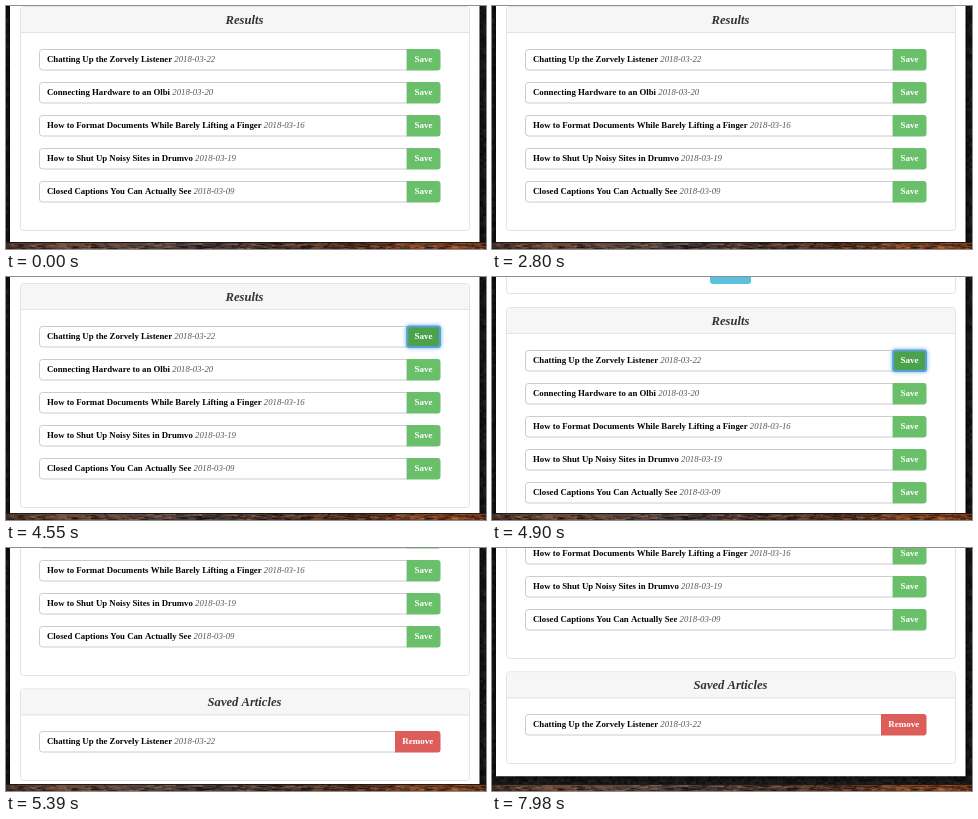
An HTML page with a canvas for the animation above (8000 ms loop, 480 by 243 pixels).

```html
<!DOCTYPE html>
<html lang="en">
<head>
<meta charset="utf-8">
<title>Saved articles</title>
<style>
html, body { margin: 0; width: 100%; height: 100%; overflow: hidden; background: #15181a; }
canvas { display: block; width: 480px; height: 243px; }
</style>
</head>
<body>
<canvas id="stage" width="480" height="243"></canvas>
<script>
const W = 480, H = 243, VIEW_BOTTOM = 236, LOOP = 8000, STEP = 70;
const FOCUS_AT = 3010;
const BUTTON_RIGHT = 434.5;
const BODY_SIZE = 8.78;
const SERIF = '"Liberation Serif", "Times New Roman", serif';
const ctx = document.getElementById('stage').getContext('2d');

const articles = [
  ['Chatting Up the Zorvely Listener', '2018-03-22'],
  ['Connecting Hardware to an Olbi', '2018-03-20'],
  ['How to Format Documents While Barely Lifting a Finger', '2018-03-16'],
  ['How to Shut Up Noisy Sites in Drumvo', '2018-03-19'],
  ['Closed Captions You Can Actually See', '2018-03-09']
];

// Page offset: [start, end, from, to]
const scrolls = [
  [4410, 4900, 0, 30],
  [4900, 5390, 30, -97],
  [5460, 5950, -97, -114]
];

function seeded(seed) {
  return () => (seed = (seed * 16807) % 2147483647) / 2147483647;
}

function makeBackdrop() {
  const layer = document.createElement('canvas');
  layer.width = W;
  layer.height = H;
  const g = layer.getContext('2d');
  const random = seeded(41);
  g.fillStyle = '#15181a';
  g.fillRect(0, 0, W, H);
  for (let y = 0; y < VIEW_BOTTOM; y += 3) {
    for (let x = 0; x < W; x += 3) {
      const v = 12 + random() * 20;
      g.fillStyle = `rgb(${v}, ${v + 2}, ${v + 3})`;
      g.fillRect(x, y, 3, 3);
    }
  }
  const ground = g.createLinearGradient(0, 0, W, 0);
  ['#3d2c26', '#6b4a3a', '#5a453d', '#4f4140', '#4c3a36', '#4d3228', '#5c3320', '#85431f', '#803c1a']
    .forEach((color, i, all) => ground.addColorStop(i / (all.length - 1), color));
  g.fillStyle = ground;
  g.fillRect(0, VIEW_BOTTOM, W, H - VIEW_BOTTOM);
  for (let i = 0; i < 420; i++) {
    g.fillStyle = random() < 0.55 ? 'rgba(15,10,10,.5)' : 'rgba(215,150,110,.28)';
    g.fillRect(random() * W, VIEW_BOTTOM + 1 + random() * 6, 3 + random() * 8, 1);
  }
  g.fillStyle = '#1c1918';
  g.fillRect(0, VIEW_BOTTOM, W, 1);
  return layer;
}

const backdrop = makeBackdrop();

function box(x, y, w, h, radius, fill, stroke) {
  ctx.beginPath();
  ctx.roundRect(x, y, w, h, radius);
  if (fill) {
    ctx.fillStyle = fill;
    ctx.fill();
  }
  if (stroke) {
    ctx.strokeStyle = stroke;
    ctx.lineWidth = 1;
    ctx.stroke();
  }
}

function glowBox(color, blur, ...shape) {
  ctx.save();
  ctx.shadowColor = color;
  ctx.shadowBlur = blur;
  box(...shape);
  ctx.restore();
}

function text(str, x, y, style, size, color, align = 'left') {
  ctx.font = `${style} ${size}px ${SERIF}`;
  ctx.textAlign = align;
  ctx.fillStyle = color;
  ctx.fillText(str, x, y);
  return ctx.measureText(str).width;
}

function card(title, top, bottom) {
  box(14.5, top + 0.5, 449, bottom - top, 3, '#fff', '#e3e3e3');
  box(15, top + 1, 448, 26, [2, 2, 0, 0], '#f6f6f6');
  ctx.fillStyle = '#e3e3e3';
  ctx.fillRect(15, top + 26, 448, 1);
  text(title, 238.5, top + 18, 'italic bold', 12.6, '#333', 'center');
}

function row([title, date], y, label, left, color, focused) {
  box(33.5, y + 0.5, left - 33, 20.5, [3, 0, 0, 3], '#fff', '#ccc');
  const width = text(title, 41, y + 13, 'bold', BODY_SIZE, '#000');
  text(date, 41 + width + 2.2, y + 13, 'italic', BODY_SIZE, '#555');
  const buttonWidth = BUTTON_RIGHT - left;
  if (focused) {
    glowBox('#66afe9', 4, left - 0.5, y - 0.5, buttonWidth + 1, 22.5, 3, '#5b9fd8');
    box(left + 1.5, y + 1.5, buttonWidth - 3, 18.5, 2, '#4ca24c');
  } else {
    box(left, y, buttonWidth, 21.5, [0, 3, 3, 0], color);
  }
  text(label, left + buttonWidth / 2, y + 13, 'bold', 9, '#fff', 'center');
}

function offsetAt(t) {
  let offset = 0;
  for (const [start, end, from, to] of scrolls) {
    if (t < start) break;
    const p = Math.min(1, (t - start) / (end - start));
    offset = from + (to - from) * p * p * (3 - 2 * p);
  }
  return Math.round(offset);
}

function draw(t) {
  ctx.drawImage(backdrop, 0, 0);
  ctx.save();
  ctx.beginPath();
  ctx.rect(0, 0, W, VIEW_BOTTOM);
  ctx.clip();
  ctx.translate(0, offsetAt(t));

  glowBox('#000', 6, 4, -100, 469.5, 442.3, 0, '#fff');

  box(14.5, -99.5, 449, 86, 3, '#fff', '#e3e3e3');
  box(218, -45, 41, 22, 3, '#5bc0de');

  card('Results', 0, 224);
  articles.forEach((article, i) => {
    row(article, 43 + i * 33, 'Save', 400.7, '#6abf6a', i === 0 && t >= FOCUS_AT);
  });

  card('Saved Articles', 237.4, 329);
  if (t >= FOCUS_AT) row(articles[0], 280, 'Remove', 389, '#dc5d59');
  ctx.restore();
}

function frame() {
  const t = performance.now() % LOOP;
  draw(Math.floor(t / STEP) * STEP);
  requestAnimationFrame(frame);
}
frame();
</script>
</body>
</html>
```
